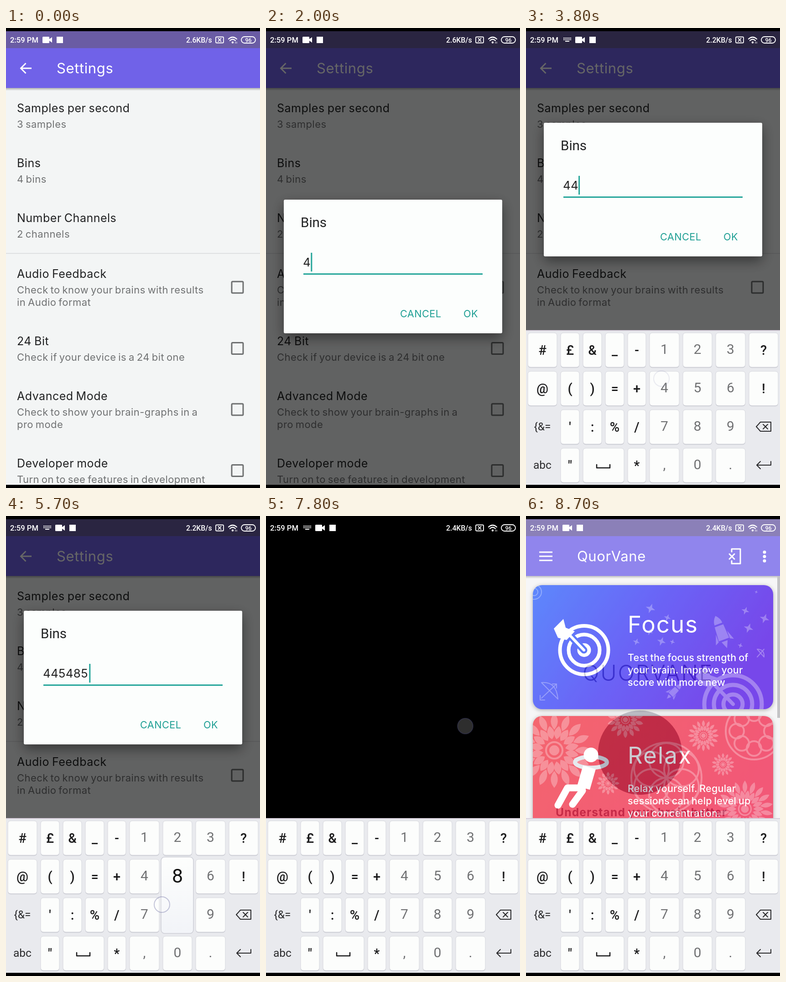
An HTML page for the animation above (8.8 s loop, 557 px wide and 1005 px high).

```html
<!DOCTYPE html>
<html lang="en">
<head>
<meta charset="utf-8">
<title>Settings demo</title>
<style>
html, body { margin: 0; width: 100%; height: 100%; overflow: hidden; background: #000; }
svg { display: block; width: 557px; height: 1005px; }
text { font-family: Inter, sans-serif; letter-spacing: .02em; word-spacing: -.06em; white-space: pre; }
.title { font-size: 25px; fill: #202122; }
.note { font-size: 22px; word-spacing: -.08em; fill: #707273; }
.bar { font-size: 31px; fill: #fff; }
.btn { font-size: 21.7px; fill: #1f9f94; }
.head { font-size: 51px; letter-spacing: .04em; fill: #fff; }
.body { font-size: 21.5px; font-weight: 500; letter-spacing: .01em; fill: #fff; }
.robo, .key, .num, .alt, #status text { font-family: Roboto, sans-serif; letter-spacing: 0; word-spacing: 0; }
#status text { font-weight: 500; fill: #fff; }
.key, .num, .alt { text-anchor: middle; }
.key { font-size: 29px; font-weight: 500; fill: #1b1b1c; }
.num { font-size: 30px; fill: #707173; }
.alt { font-size: 24.5px; fill: #2b2b2d; }
.line { fill: none; stroke-linecap: round; stroke-linejoin: round; }
.card { filter: drop-shadow(0 2px 5px rgba(0, 0, 0, .4)); }

#caption, #modal, #dialog, #keys, #black, #splash, #home, #kbIcon, #icons { animation: 8800ms linear infinite; }
#caption { animation-name: caption; animation-timing-function: step-end; }
#modal { animation-name: modal; }
#dialog { animation-name: lift; }
#keys { animation-name: rise; }
#black { animation-name: black; animation-timing-function: step-end; }
#splash { animation-name: splash; animation-timing-function: step-end; }
#home { animation-name: home; }
#kbIcon { animation-name: kbIcon; animation-timing-function: step-end; }
#icons { animation-name: shift; animation-timing-function: step-end; }
@keyframes caption { 0% { opacity: 0 } 5.68% { opacity: 1 } 18.18%, 100% { opacity: 0 } }
@keyframes modal { 0%, 19.3% { opacity: 0 } 21.6%, 100% { opacity: 1 } }
@keyframes lift { 0%, 26.1% { transform: none; animation-timing-function: ease-out } 29.5%, 100% { transform: translateY(-168px) } }
@keyframes rise { 0%, 26.1% { transform: translateY(344px); animation-timing-function: ease-out } 29.5%, 100% { transform: none } }
@keyframes black { 0% { opacity: 0 } 87.5%, 100% { opacity: 1 } }
@keyframes splash { 0% { opacity: 0 } 93.18%, 100% { opacity: 1 } }
@keyframes home { 0%, 95.45% { opacity: 0 } 98.86%, 100% { opacity: .78 } }
@keyframes kbIcon { 0% { opacity: 0 } 28.4% { opacity: 1 } 93.18%, 100% { opacity: 0 } }
@keyframes shift { 0% { transform: none } 28.4% { transform: translateX(28px) } 93.18%, 100% { transform: none } }
</style>
</head>
<body>
<svg viewBox="0 0 557 1005">
  <defs>
    <linearGradient id="blue" x2="1" y2=".35"><stop stop-color="#2f66fb"/><stop offset=".5" stop-color="#4038f4"/><stop offset="1" stop-color="#5113e4"/></linearGradient>
    <linearGradient id="red" x2="1" y2=".4"><stop stop-color="#f13a46"/><stop offset="1" stop-color="#ee2850"/></linearGradient>
    <linearGradient id="pop" x2="0" y2="1"><stop stop-color="#fdfefd"/><stop offset="1" stop-color="#f2f4f8"/></linearGradient>
    <linearGradient id="under" x2="0" y2="1"><stop stop-color="#000" stop-opacity=".28"/><stop offset="1" stop-color="#000" stop-opacity="0"/></linearGradient>
    <clipPath id="c1"><rect x="15" y="151" width="527" height="271" rx="20"/></clipPath>
    <clipPath id="c2"><rect x="15" y="437" width="527" height="271" rx="20"/></clipPath>
  </defs>

  <g id="settings">
    <rect width="557" height="1005" fill="#f3f5f5"/>
    <rect y="131" width="557" height="6" fill="url(#under)"/>
    <rect y="7" width="557" height="37" fill="#6a5ca4"/>
    <rect y="44" width="557" height="87" fill="#7062e8"/>
    <path d="M56 88H33M43.500 77L32.500 88L43.500 99" fill="none" stroke="#fff" stroke-width="3"/>
    <text class="bar" x="111" y="99">Settings</text>
    <g id="list"></g>
    <path d="M0 492.500H557" stroke="#d6d8d9" stroke-width="1.500"/>
  </g>

  <g id="modal">
    <rect y="7" width="557" height="991" opacity=".6"/>
    <g id="dialog">
      <rect x="39" y="375" width="479" height="292" rx="3" fill="#fcfefd" style="filter:drop-shadow(0 10px 14px rgba(0,0,0,.45))"/>
      <text class="robo" x="76" y="435" font-size="29.500" fill="#212223">Bins</text>
      <text id="value" x="81" y="521" font-size="26" fill="#222" style="letter-spacing:.01em">4</text>
      <rect id="cursor" y="491" width="3" height="41" fill="#26a69a"/>
      <rect x="82" y="536" width="393" height="3" fill="#26a69a"/>
      <text class="btn" x="294" y="632">CANCEL</text>
      <text class="btn" x="433" y="632">OK</text>
    </g>
  </g>

  <rect id="black" width="557" height="1005"/>

  <g id="splash">
    <rect y="6" width="557" height="999" fill="#fff"/>
    <text x="124" y="360" font-size="48" font-weight="300" fill="#2b2358" style="letter-spacing:.06em">QUORVANE</text>
    <circle cx="250" cy="517" r="92" fill="#1e1c3c"/>
    <text x="65" y="656" font-size="24.500" font-weight="700" fill="#35143c" style="letter-spacing:.05em">Understand your brain better</text>
  </g>

  <g id="home">
    <rect y="6" width="557" height="999" fill="#f4f4f5"/>
    <rect y="131" width="557" height="6" fill="url(#under)"/>
    <rect y="7" width="557" height="37" fill="#6a5ca4"/>
    <rect y="44" width="557" height="87" fill="#7062e8"/>
    <rect x="551" y="131" width="6" height="310" fill="#b4b4b6"/>
    <g fill="none" stroke="#fff" stroke-width="3">
      <path d="M29 79H58M29 88H58M29 97H58"/>
      <path class="line" d="M451 78V72H470V104H451V98M446 83L457 94M457 83L446 94"/>
    </g>
    <g fill="#fff"><circle cx="523" cy="79" r="3.500"/><circle cx="523" cy="88.500" r="3.500"/><circle cx="523" cy="98" r="3.500"/></g>
    <text class="bar" x="112" y="99">QuorVane</text>

    <rect class="card" x="15" y="151" width="527" height="271" rx="20" fill="url(#blue)"/>
    <g clip-path="url(#c1)">
      <g id="sky" opacity=".3" fill="#fff"></g>
      <g class="line" opacity=".32" stroke="#fff" stroke-width="9">
        <circle cx="454" cy="411" r="63"/><circle cx="454" cy="411" r="42"/><circle cx="454" cy="411" r="21"/>
        <path d="M454 411L400 355" stroke-width="8"/>
        <path d="M372 350L394 326L404 348L428 356L406 376L388 370Z" fill="#fff" stroke="none"/>
        <g stroke-width="2"><circle cx="18" cy="166" r="8"/><circle cx="18" cy="166" r="16"/>
          <path d="M34 364C58 362 68 376 70 400M34 364L70 400M34 398L66 368M58 367L67 367L67 376M31 392V402H41"/>
          <path d="M507 291L522 308M507 308L522 291M507 291Q523 291 522 308"/></g>
      </g>
      <g fill="none" stroke="#fff" stroke-width="8"><circle cx="127.500" cy="293" r="53"/><circle cx="127.500" cy="293" r="34"/></g>
      <circle cx="127.500" cy="293" r="15" fill="#fff"/>
      <path class="line" d="M86 250L127 293" stroke="#2f52f8" stroke-width="15"/>
      <path class="line" d="M86 250L127 293" stroke="#fff" stroke-width="6"/>
      <path d="M61 246L82 225L87 244L107 252L89 271L70 266Z" fill="#fff"/>
      <text class="head" x="223" y="255">Focus</text>
      <text class="body" x="223" y="317">Test the focus strength of</text>
      <text class="body" x="223" y="344">your brain. Improve your</text>
      <text class="body" x="223" y="371">score with more new</text>
    </g>

    <rect class="card" x="15" y="437" width="527" height="271" rx="20" fill="url(#red)"/>
    <g clip-path="url(#c2)">
      <g id="petals" opacity=".3" fill="#fff" stroke="#fff"></g>
      <g class="line" stroke="#fff">
        <ellipse cx="142.500" cy="538" rx="35" ry="12" stroke="#dfe3ea" stroke-width="9"/>
        <path d="M139 549L126 594" stroke-width="29" stroke-linecap="butt"/>
        <path d="M124 594L91 594L70 632M124 600L102 630" stroke-width="15"/>
      </g>
      <circle cx="142.500" cy="522" r="16" fill="#fff"/>
      <text class="head" x="223" y="541">Relax</text>
      <text class="body" x="223" y="603">Relax yourself. Regular</text>
      <text class="body" x="223" y="630">sessions can help level up</text>
      <text class="body" x="223" y="657">your concentration.</text>
    </g>
  </g>

  <g id="keys"></g>
  <g id="popup" visibility="hidden">
    <rect width="71" height="167" rx="8" fill="url(#pop)" stroke="#cdced6" stroke-width="1.500"/>
    <text class="num" x="36" y="56" style="font-size:43px;fill:#111"></text>
  </g>

  <g id="status">
    <text x="9" y="32" font-size="16.600">2:59 PM</text>
    <text id="speed" x="395" y="32" font-size="15.800">2.6KB/s</text>
    <g id="kbIcon" stroke="#fff" fill="none" stroke-width="2"><path d="M82 22H99M82 25.500H99" stroke-dasharray="2 1"/><path d="M86 29H95"/></g>
    <g id="icons" fill="#fff"><rect x="80" y="19" width="15" height="14" rx="1.500"/><path d="M94 25L101 20V32L94 27Z"/><rect x="111" y="19" width="14" height="14"/></g>
    <g class="line" stroke="#fff" stroke-width="1.800">
      <rect x="460" y="19.500" width="17" height="13" rx="2"/><path d="M465.500 23L471.500 29M471.500 23L465.500 29"/>
      <path d="M488 24Q497 16 506 24M491 27.500Q497 22 503 27.500" stroke-width="2.200"/>
      <rect x="516" y="19" width="31" height="14" rx="7"/>
    </g>
    <circle cx="497" cy="31.500" r="2.200" fill="#fff"/>
    <path d="M503 30V34M506 30V34" stroke="#fff"/>
    <text x="531.500" y="30.500" font-size="12.500" text-anchor="middle">96</text>
  </g>

  <circle id="touch" r="17" fill="#fff" fill-opacity=".22" stroke="#5a5a96" stroke-opacity=".34" stroke-width="2"/>

  <g id="caption">
    <rect x="47" y="810" width="463" height="64" opacity=".6"/>
    <text x="57" y="855" font-size="48" font-weight="500" fill="#fff" style="letter-spacing:0;word-spacing:-.1em">Tap "Bins" textview</text>
  </g>
  <path d="M0 0H557V7H0ZM0 998H557V1005H0Z"/>
</svg>
<script>
const $ = id => document.getElementById(id);
const LOOP = 8800;
const text = (cls, x, y, s) => `<text class="${cls}" x="${x}" y="${y}">${s.replace('&', '&amp;')}</text>`;

// Preference rows: title baseline, title, notes, checkbox centre
const rows = [
  [184, 'Samples per second', ['3 samples']],
  [304, 'Bins', ['4 bins']],
  [424, 'Number Channels', ['2 channels']],
  [546, 'Audio Feedback', ['Check to know your brains with results', 'in Audio format'], 566.5],
  [693, '24 Bit', ['Check if your device is a 24 bit one'], 700],
  [813, 'Advanced Mode', ['Check to show your brain-graphs in a', 'pro mode'], 833.5],
  [960, 'Developer mode', ['Turn on to see features in development'], 967]
];
$('list').innerHTML = rows.map(([y, title, notes, box]) =>
  text('title', 24, y, title) +
  notes.map((s, i) => text('note', 24, y + 34 + 27 * i, s)).join('') +
  (box ? `<rect x="495" y="${box - 12.5}" width="25" height="25" rx="2" fill="none" stroke="#6e7071" stroke-width="3"/>` : '')
).join('');

// Keyboard
const colX = [4, 76, 125, 174, 223, 271, 344, 416, 489];
const colW = [64, 41, 41, 41, 40, 65, 64, 65, 64];
const rowY = r => 666 + 84 * r;
const cap = (x, y, w) =>
  `<rect x="${x}" y="${y + 1.5}" width="${w}" height="75" rx="6" fill="#c6c7cf"/>
   <rect x="${x}" y="${y}" width="${w}" height="75" rx="6" fill="#fcfdfc" stroke="#d6d7dd"/>`;
let board = '<rect y="661" width="557" height="344" fill="#e9eaee"/><rect y="660" width="557" height="2" fill="#d8d0dc"/>';
['# £ & _ - 1 2 3 ?', '@ ( ) = + 4 5 6 !', "{&= ' : % / 7 8 9 del", 'abc " space skip * , 0 . enter'].forEach((line, r) =>
  line.split(' ').forEach((k, c) => {
    const y = rowY(r), x = colX[c], w = k === 'space' ? 90 : colW[c], mid = x + w / 2;
    if (k === 'skip') return;
    if (r < 2 || c % 8) board += cap(x, y, w);
    if (k === 'space') board += `<path class="line" d="M155 954V961H184V954" stroke="#1b1b1c" stroke-width="2.5"/>`;
    else if (k === 'del') board += '<path class="line" d="M505 871L514 861H537V881H514ZM520 866L530 876M530 866L520 876" stroke="#2b2b2d" stroke-width="2"/>';
    else if (k === 'enter') board += '<path class="line" d="M537 947V955H506M514 947L506 955L514 963" stroke="#2b2b2d" stroke-width="2"/>';
    else if (k.length > 1) board += text('alt', mid, y + 45, k);
    else if (c > 4 && c < 8) board += text('num', mid, y + 46, k);
    else board += text('key', mid, y + 48, k);
  }));
$('keys').innerHTML = board;

// Card decorations
const star = (x, y, r, q = r * .25) =>
  `<path d="M${x} ${y - r}L${x + q} ${y - q}L${x + r} ${y}L${x + q} ${y + q}L${x} ${y + r}L${x - q} ${y + q}L${x - r} ${y}L${x - q} ${y - q}Z" transform="rotate(20 ${x} ${y})"/>`;
const rocket = (x, y, s, a) =>
  `<g transform="translate(${x} ${y}) rotate(${a}) scale(${s})"><path d="M0 -37Q9 -28 9 -18H-9Q-9 -28 0 -37ZM-10 -14H10L12 18H-12ZM-13 2L-21 24L-13 20ZM13 2L21 24L13 20ZM-7 22H7L0 38Z"/></g>`;
$('sky').innerHTML = [
  [273, 202, 11], [310, 222, 8], [271, 253, 8], [242, 275, 8], [297, 274, 10], [321, 275, 6],
  [481, 207, 9], [488, 245, 11], [523, 224, 11], [470, 283, 6], [505, 166, 4]
].map(p => star(...p)).join('') + rocket(428, 253, 1, -20) + rocket(325, 383, .6, 45);

// Two staggered rings of pointed petals around a ringed centre
const flower = (x, y, r, n) => {
  const petal = (from, to, turn) => {
    const w = r * 3 / n, mid = (from + to) / 2;
    return `<path d="M0 ${-r * from}Q${w} ${-r * mid} 0 ${-r * to}Q${-w} ${-r * mid} 0 ${-r * from}Z" stroke="none" transform="rotate(${turn})"/>`;
  };
  let s = `<g transform="translate(${x} ${y})"><circle r="${r * .13}"/><circle r="${r * .22}" fill="none" stroke-width="${r * .05}"/>`;
  for (let i = 0; i < n; i++)
    s += petal(.55, 1, 360 * i / n) + petal(.3, .66, 360 * (i + .5) / n);
  return s + '</g>';
};
let rosette = '<g fill="none" stroke-width="4"><circle cx="308" cy="572" r="77"/>';
for (let i = 0; i < 6; i++)
  rosette += `<circle cx="308" cy="534" r="38" transform="rotate(${60 * i} 308 572)"/>`;
for (let i = 0; i < 8; i++)
  rosette += `<circle cx="500" cy="432" r="16" transform="rotate(${45 * i} 500 470)"/>`;
rosette += '<circle cx="500" cy="470" r="62"/></g>';
$('petals').innerHTML = rosette + [
  [62, 512, 82, 16], [389, 480, 34, 16], [432, 543, 25, 14], [180, 584, 25, 12], [480, 640, 62, 18], [218, 445, 40, 14]
].map(p => flower(...p)).join('');

// Key releases: time, digit
const taps = [[3600, 4], [4800, 5], [5000, 4], [5200, 8], [5500, 5], [5800, 8], [6100, 5], [6500, 8], [6900, 5]];
const spots = { 4: [297, 766], 5: [370, 766], 8: [342, 849], ok: [437, 459] };
const touches = [...taps, [7750, 'ok']];
const HOLD = 160, FADE = 300;

function draw(t) {
  const done = taps.filter(p => p[0] <= t);
  const value = '4' + done.map(p => p[1]).join('');
  const last = done.length ? done[done.length - 1][0] : 1900;
  $('value').textContent = value;
  $('cursor').setAttribute('x', 81.5 + 16.8 * value.length);
  $('cursor').setAttribute('visibility', (t - last) % 1000 < 500 ? 'visible' : 'hidden');
  $('speed').textContent = (t < 2700 ? '2.6' : t < 6700 ? '2.2' : '2.4') + 'KB/s';

  const down = taps.find(([at]) => t >= at - HOLD && t < at);
  $('popup').setAttribute('visibility', down ? 'visible' : 'hidden');
  if (down) {
    const d = down[1], row = Math.floor((d - 1) / 3), col = 5 + (d - 1) % 3;
    $('popup').setAttribute('transform', `translate(${colX[col] - 4} ${rowY(row) - 89})`);
    $('popup').lastElementChild.textContent = d;
  }

  const near = touches.filter(([at]) => t >= at - HOLD && t < at + FADE).pop();
  let alpha = 0;
  if (near) {
    const [x, y] = spots[near[1]];
    $('touch').setAttribute('cx', x);
    $('touch').setAttribute('cy', y);
    alpha = Math.min(1, 1 - (t - near[0]) / FADE);
  }
  $('touch').setAttribute('opacity', alpha);
}

let start;
function tick(now) {
  start ??= now;
  draw((now - start) % LOOP);
  requestAnimationFrame(tick);
}
draw(0);
requestAnimationFrame(tick);
</script>
</body>
</html>
```
